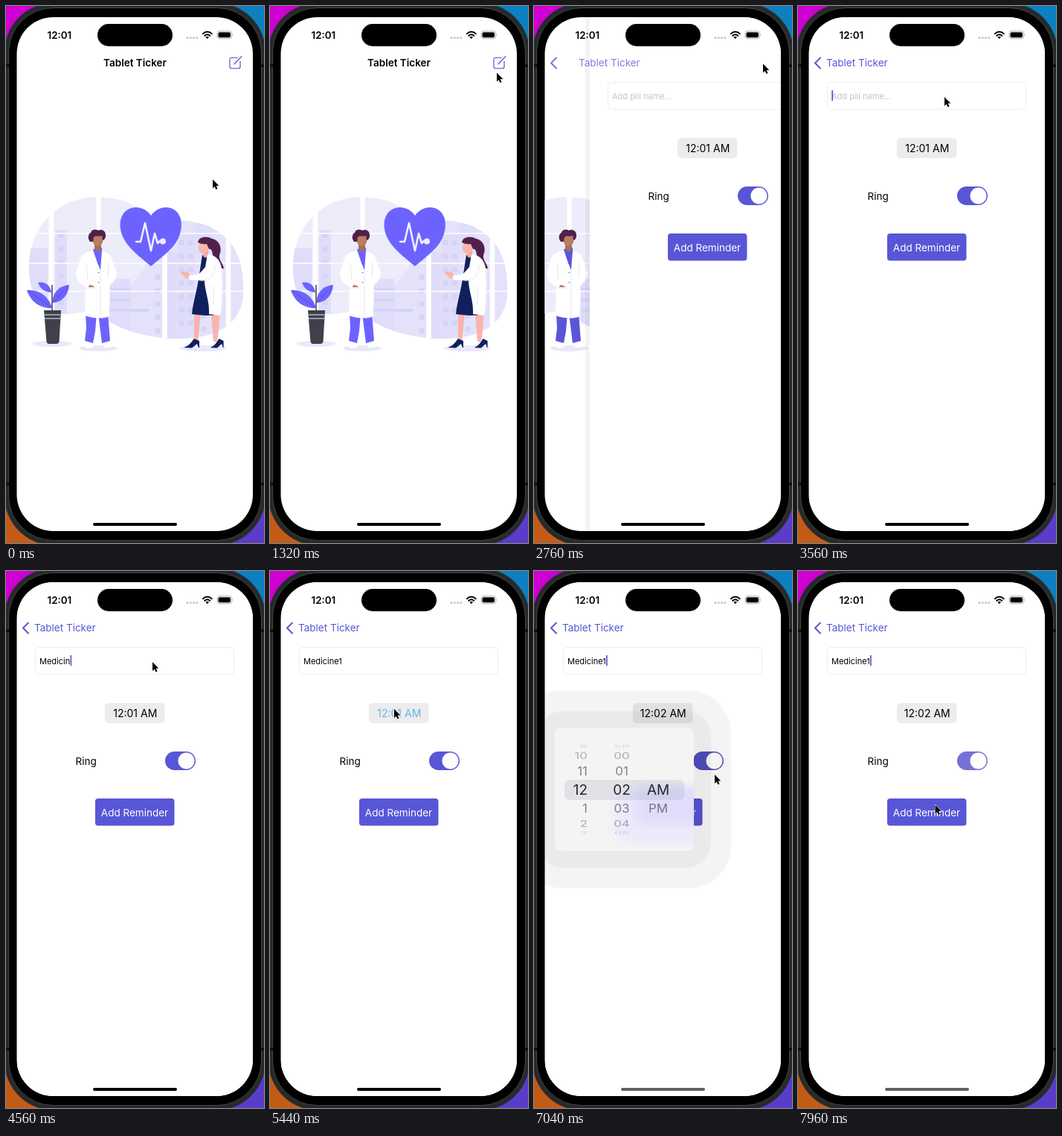
An HTML page for the animation above (8000 ms loop, 347 px wide and 720 px high).

```html
<!DOCTYPE html>
<html lang="en">
<head>
<meta charset="utf-8">
<title>Tablet Ticker</title>
<style>
  html, body { margin: 0; width: 100%; height: 100%; overflow: hidden; background: #000; }
  svg { display: block; width: 347px; height: 720px; font-family: Inter, Roboto, sans-serif; }
  .accent { fill: #6c63ff; }
  .line { fill: none; stroke-linecap: round; stroke-linejoin: round; }
  .mid { text-anchor: middle; }
</style>
</head>
<body>
<svg viewBox="0 0 347 720">
  <defs>
    <clipPath id="screenClip"><rect x="14.500" y="15" width="317.500" height="689" rx="49"/></clipPath>
    <clipPath id="panelClip"><rect x="28" y="210" width="187" height="165" rx="8"/></clipPath>
    <clipPath id="blobClip">
      <path d="M31 352C30 295 72 256 122 256C165 256 185 276 205 290C240 283 275 292 290 306C312 322 320 350 319 385C318 425 285 446 232 446C185 446 140 430 120 408C95 410 75 420 55 405C38 392 31 375 31 352"/>
    </clipPath>
    <linearGradient id="magenta" x2="1" y2="1"><stop stop-color="#d000d4"/><stop offset="1" stop-color="#a000b0"/></linearGradient>
    <linearGradient id="orange" x2="0" y2="1"><stop stop-color="#a0441c"/><stop offset="1" stop-color="#c45c18"/></linearGradient>
    <filter id="soft"><feGaussianBlur stdDeviation="7"/></filter>
    <filter id="edge"><feGaussianBlur stdDeviation="1"/></filter>
  </defs>

  <!-- Wallpaper and phone -->
  <rect width="173" height="360" fill="url(#magenta)"/>
  <rect x="173" width="174" height="360" fill="#0c80c0"/>
  <rect y="360" width="173" height="360" fill="url(#orange)"/>
  <rect x="173" y="360" width="174" height="360" fill="#5a3cc8"/>
  <rect x="-2" y="-4" width="351" height="727" rx="66" fill="#272a2a"/>
  <rect x="3.500" y="2.500" width="340" height="714" rx="60" stroke="#444848"/>
  <path d="M0 80h4M0 641h4M343 80h4M343 641h4" stroke="#111" stroke-width="4"/>
  <rect x="14.500" y="15" width="317.500" height="689" rx="49" fill="#fff"/>

  <g clip-path="url(#screenClip)">
    <g id="home">
      <g clip-path="url(#blobClip)">
        <rect x="20" y="250" width="310" height="210" fill="#edecfa"/>
        <path d="M205 300C240 278 285 285 330 300V460H120V408C140 400 160 385 180 360C195 345 190 315 205 300" fill="#e4e2fb"/>
        <path d="M66 300h16v115h-16zM30 325h26v75h-26zM140 366h28v80h-28zM231 305h24v141h-24zM255 292h22v40h-22zM217 330h14v116h-14z" fill="#dfddf9"/>
        <path d="M74 304V410M236 314V440M248 314V440M204 360V440M266 340V440" stroke="#d6d3f7" stroke-width="7" stroke-dasharray="7 11"/>
        <path d="M140 380h26M140 394h26M140 408h52" stroke="#d6d3f7" stroke-width="4"/>
        <path d="M61 250V460M124.500 250V460M213.500 250V460M299 250V460" stroke="#fff" stroke-width="6.500"/>
        <path d="M20 305H330M20 345H330M20 382.500H330" stroke="#fff" stroke-width="1.400"/>
      </g>
      <g fill="#e9e8f8">
        <ellipse cx="62" cy="453" rx="26" ry="4"/>
        <ellipse cx="124" cy="459" rx="26" ry="4"/>
        <ellipse cx="265" cy="459" rx="32" ry="4"/>
      </g>

      <!-- Heart -->
      <path class="accent" d="M195 349C185 340 167 328 159 313C147 291 156 270 175 270C184 270 191 275 195 281C199 275 206 270 215 270C234 270 242 291 231 313C223 328 205 340 195 349"/>
      <path class="line" d="M175 316h6L187 291L195 328L200 305L204 318L207 315" stroke="#efedff" stroke-width="2.600"/>
      <circle cx="211" cy="315.500" r="4" fill="#efedff"/>

      <!-- Plant -->
      <path d="M62 374V410" stroke="#3f4049" stroke-width="1.500"/>
      <path class="accent" d="M62 405C46 406 33 396 28 381C46 380 58 390 62 405M63 398C62 384 72 375 85 374C84 387 76 397 63 398M61 384C52 384 46 379 43 371C53 369 60 375 61 384"/>
      <path class="line" d="M30 382L61 404M64 397L83 376" stroke="#4c45c8" stroke-width=".7"/>
      <path d="M51 408h23l-2.500 42q-.5 3-4 3h-9.500q-3 0-3.500-3z" fill="#3f4049"/>
      <path d="M52 414h21M52 419h21" stroke="#8f9aad" stroke-width="2"/>

      <!-- Man -->
      <path class="accent" d="M107 412H122L120 436L117 452L106 449L108 432ZM124 412H137L140 449L129 452L127 436Z"/>
      <path d="M107 451l10 1 1 5q-6 3-11 1zM130 452l9-1 4 5q-4 3-11 2z" fill="#fff"/>
      <path class="accent" d="M117 326L129 324L130 350L127 358Z"/>
      <path d="M119 316h9v10l-4 4-5-4z" fill="#a56f54"/>
      <ellipse cx="123.500" cy="314" rx="7" ry="8" fill="#b87f62"/>
      <path d="M113 316C109 311 111 305 114 304C115 299 121 299 124 301C129 298 135 302 134 309Q133 314 130 314L129 308C125 310 121 307 118 310L117 316Z" fill="#51204b"/>
      <path d="M116 328C104 331 100 334 98 345L94 358C94 366 98 372 107 377L106 415C116 419 130 420 139 416V375C146 370 149 364 149 357L142 338C140 331 134 330 129 328L127 354Z" fill="#fff"/>
      <path class="line" d="M127 354V417M108 346L110 366M138 345L137 364M109 378H122" stroke="#dedeea" stroke-width=".8"/>
      <path d="M112 374q5 0 7 3h-8z" fill="#b87f62"/>
      <path d="M124.500 345v1M124.500 357v1M124.500 370v1" stroke="#333" stroke-width="1.300"/>

      <!-- Woman -->
      <path d="M253 412h9L258 450h-5zM276 412h12L286 434L284 450h-5z" fill="#f9b4ad"/>
      <g fill="#10205c">
        <path id="shoe" d="M239 458C246 456 250 450 253 446L260 449V458H259L257 453L250 458.500Z"/>
        <use href="#shoe" transform="translate(69 0) scale(.86 1)"/>
        <path d="M264 334L270 336L272 370L286 413C276 416 262 415 250 413C251 400 256 385 259 366Z"/>
      </g>
      <path d="M265 325h7v9l-4 4-3-3z" fill="#f5a8a1"/>
      <ellipse cx="265.500" cy="324" rx="6.500" ry="8" fill="#f9b4ad"/>
      <path d="M258 317C259 309 270 308 277 312C288 314 291 326 287 334C286 342 292 344 293 352C284 352 278 346 278 337C278 328 276 325 273 326L270 319Q263 320 258 317" fill="#51204b"/>
      <path d="M235 357q8-4 14 5l-3 4q-8-1-11-9" fill="#f9b4ad"/>
      <path d="M271 333C282 333 289 342 290 352C291 375 292 395 288 415L273 413C274 395 267 382 267 368L246 367V361L259 360L268 350Z" fill="#fff"/>
      <path class="line" d="M282 348C280 363 272 370 260 368M279 376V400M233 360l10 3" stroke="#dedeea" stroke-width=".8"/>
    </g>

    <g id="form">
      <rect x="9" y="15" width="6" height="689" opacity=".045"/>
      <rect x="15" y="15" width="318" height="689" fill="#fff"/>
      <rect x="39.500" y="102.500" width="267" height="36" rx="4" fill="#fff" stroke="#ededed"/>
      <text id="field" x="45" y="124.500" font-size="11"></text>
      <rect id="caret" y="113" width="1.700" height="14" fill="#5856d6"/>
      <rect x="133" y="177" width="80.500" height="27" rx="5" fill="#ececed"/>
      <text id="timeLabel" class="mid" x="173.800" y="195.500" font-size="14"></text>
      <text x="93.500" y="259.500" font-size="13.500">Ring</text>
      <rect id="toggle" x="214" y="242" width="41" height="25" rx="12.500"/>
      <circle cx="242.500" cy="254.500" r="11" fill="#fff"/>
      <rect x="120" y="305" width="106.500" height="36.500" rx="4" fill="#5856d6"/>
      <text class="mid" x="173" y="328.500" font-size="13.500" fill="#fff">Add Reminder</text>
    </g>

    <g id="popover">
      <rect x="-22" y="161" width="287" height="264" rx="56" opacity=".045" filter="url(#edge)"/>
      <rect x="5" y="188" width="233" height="210" rx="34" opacity=".04" filter="url(#edge)"/>
      <g clip-path="url(#panelClip)">
        <rect x="28" y="210" width="187" height="165" fill="#f4f4f4"/>
        <rect x="108" y="292" width="130" height="72" rx="22" fill="#ebe9fb" filter="url(#soft)"/>
        <rect x="138" y="290" width="90" height="50" rx="12" fill="#dfddfa" filter="url(#soft)"/>
        <rect x="41" y="280" width="161" height="27" rx="6" fill="#8088a8" opacity=".17"/>
        <g id="wheels"></g>
      </g>
    </g>

    <!-- Navigation bar -->
    <g font-size="13.500">
      <text id="title" class="mid" y="81" font-weight="600">Tablet Ticker</text>
      <text id="backLabel" y="81" fill="#5856d6">Tablet Ticker</text>
      <path id="chevron" class="line" d="M30 69.500L23 76.500L30 83.500" stroke="#5856d6" stroke-width="2"/>
      <path id="compose" class="line" d="M311 69.500H303Q301 69.500 301 71.500V81.500Q301 83.500 303 83.500H313Q315 83.500 315 81.500V74M307.500 77L317 67.500M307.500 77l-.7 1 1.200-.5" stroke="#5b57c8" stroke-width="1.200"/>
    </g>

    <!-- Status bar -->
    <text x="55.500" y="43.700" font-size="13.400" font-weight="600">12:01</text>
    <path class="line" d="M244 42.500h14" stroke="#c5c5c8" stroke-width="3.200" stroke-dasharray="0 4.300"/>
    <path class="line" d="M264.800 37.200Q270.800 31.800 276.800 37.200M267.300 39.800Q270.800 36.800 274.300 39.800" stroke="#000" stroke-width="2"/>
    <path d="M268.600 41.700Q270.800 40 273 41.700L270.800 44.200Z"/>
    <rect x="284" y="33.700" width="19.500" height="10" rx="3" fill="none" stroke="#aaa"/>
    <rect x="285.500" y="35.200" width="16.500" height="7" rx="1.800"/>
    <path d="M304.500 37q1.500 1.700 0 3.500z" fill="#aaa"/>
    <rect x="123" y="24" width="101" height="30" rx="15"/>
    <rect id="homeBar" x="117" y="693" width="113" height="4" rx="2"/>
  </g>

  <path id="cursor" d="M0 0V13.500L3 10.700L5.100 15.300L7.400 14.300L5.300 9.800H9.500Z" stroke="#fff" stroke-width="1.200" stroke-linejoin="round" paint-order="stroke"/>
</svg>

<script>
const LOOP = 8000;
const PUSH_AT = 2525;
const POPOVER_OPEN = 5560, POPOVER_CLOSE = 7000;
const TYPED = "Medicine1", TYPE_FROM = 3700, TYPE_TO = 4700;
const FOCUS_AT = 3480, TIME_PRESS = 5380;

// Cursor stops: time, x, y
const PATH = [
  [0, 278, 232.5], [520, 278, 232.5], [1320, 305, 89.5], [1560, 308, 77.5],
  [2900, 308, 77.5], [3400, 197, 122], [4760, 197, 122], [5300, 167, 185],
  [5720, 167, 185], [6160, 117, 318], [6280, 117, 318], [6600, 117, 293],
  [6680, 117, 293], [6960, 243, 273], [7160, 243, 273], [7760, 184.5, 313.5], [LOOP, 184.5, 313.5]
];

const el = Object.fromEntries([...document.querySelectorAll("[id]")].map(node => [node.id, node]));
const clamp = v => Math.max(0, Math.min(1, v));
const ramp = (t, from, to) => clamp((t - from) / (to - from));
const smooth = v => v * v * (3 - 2 * v);
const set = (node, attrs) => {
  for (const name in attrs) node.setAttribute(name, attrs[name]);
};

// Critically damped spring from 0 to 1
function spring(ms, rate = 0.013) {
  if (ms <= 0) return 0;
  const s = ms * rate;
  return s > 9 ? 1 : 1 - Math.exp(-s) * (1 + s);
}

function cursorAt(t) {
  const i = PATH.findIndex(stop => stop[0] > t);
  const [t0, x0, y0] = PATH[i - 1], [t1, x1, y1] = PATH[i];
  const k = smooth(ramp(t, t0, t1));
  return [x0 + (x1 - x0) * k, y0 + (y1 - y0) * k];
}

// One picker column, rolled around a cylinder
function wheel(x, anchor, position, label) {
  let rows = "";
  for (let n = Math.round(position) - 3; n <= Math.round(position) + 3; n++) {
    const angle = (n - position) * 0.43, text = label(n);
    if (!text || Math.abs(angle) > 1.4) continue;
    const away = Math.abs(n - position);
    const size = 19 - 2 * Math.min(1, away);
    const alpha = away < 1 ? 0.82 - 0.35 * away : 0.47 - 0.17 * (away - 1);
    rows += `<text transform="translate(${x} ${293.5 + 60.6 * Math.sin(angle)}) scale(1 ${Math.cos(angle)})"
      y="${size * 0.36}" font-size="${size}" text-anchor="${anchor}" opacity="${alpha}">${text}</text>`;
  }
  return rows;
}

function drawPopover(t) {
  const closing = smooth(ramp(t, POPOVER_CLOSE + 40, POPOVER_CLOSE + 280));
  const shown = spring(t - POPOVER_OPEN, 0.018) * (1 - closing);
  const scale = 0.3 + 0.7 * shown;
  set(el.popover, {
    opacity: clamp(shown * 1.2),
    transform: `translate(173 204) scale(${scale}) translate(-173 -204)`,
    visibility: shown > 0.01 ? "visible" : "hidden"
  });
  const minute = 1 + smooth(ramp(t, 6280, 6640));
  el.wheels.innerHTML =
    wheel(72, "end", 12, n => (n + 11) % 12 + 1) +
    wheel(118, "middle", minute, n => String((n + 60) % 60).padStart(2, "0")) +
    wheel(167, "middle", 0, n => ["AM", "PM"][n]);
  return shown;
}

function drawField(t) {
  const count = Math.floor(ramp(t, TYPE_FROM, TYPE_TO) * TYPED.length);
  el.field.textContent = count ? TYPED.slice(0, count) : "Add pill name...";
  set(el.field, { fill: count ? "#000" : "#c4c4c8" });
  const blinkOn = t < TYPE_TO + 160 || (t + 160) % 1000 < 540;
  set(el.caret, {
    x: 45.3 + (count ? el.field.getComputedTextLength() : 0),
    opacity: t >= FOCUS_AT && blinkOn ? 1 : 0
  });
}

function draw(t) {
  const push = spring(t - PUSH_AT);
  set(el.home, { transform: `translate(${-95 * push} 0)`, visibility: push < 1 ? "visible" : "hidden" });
  set(el.form, { transform: `translate(${317 * (1 - push)} 0)`, visibility: push > 0 ? "visible" : "hidden" });
  for (const node of document.querySelectorAll(".accent"))
    node.style.fill = push > 0 ? "#5b55d8" : "";

  const slide = push ** 1.25;
  set(el.title, { x: 173.5 - 95.5 * slide, opacity: clamp(1 - 1.3 * slide) });
  set(el.backLabel, { x: 38 + 95.5 * (1 - slide), opacity: slide });
  set(el.chevron, { opacity: push });
  set(el.compose, { opacity: clamp(1 - 3 * push) });

  drawField(t);
  const shown = drawPopover(t);
  el.timeLabel.textContent = t < 6680 ? "12:01 AM" : "12:02 AM";
  set(el.timeLabel, { fill: t >= TIME_PRESS && t < POPOVER_CLOSE ? "#64b5e6" : "#000" });
  set(el.toggle, { fill: shown > 0.05 ? "#5250c0" : t > POPOVER_CLOSE ? "#7472d6" : "#5856d6" });
  set(el.homeBar, { fill: t > POPOVER_OPEN ? "#606064" : "#000" });

  const [x, y] = cursorAt(t);
  set(el.cursor, { transform: `translate(${x} ${y}) scale(.88)` });
}

const start = performance.now();
function tick() {
  draw((performance.now() - start) % LOOP);
  requestAnimationFrame(tick);
}
tick();
</script>
</body>
</html>
```
